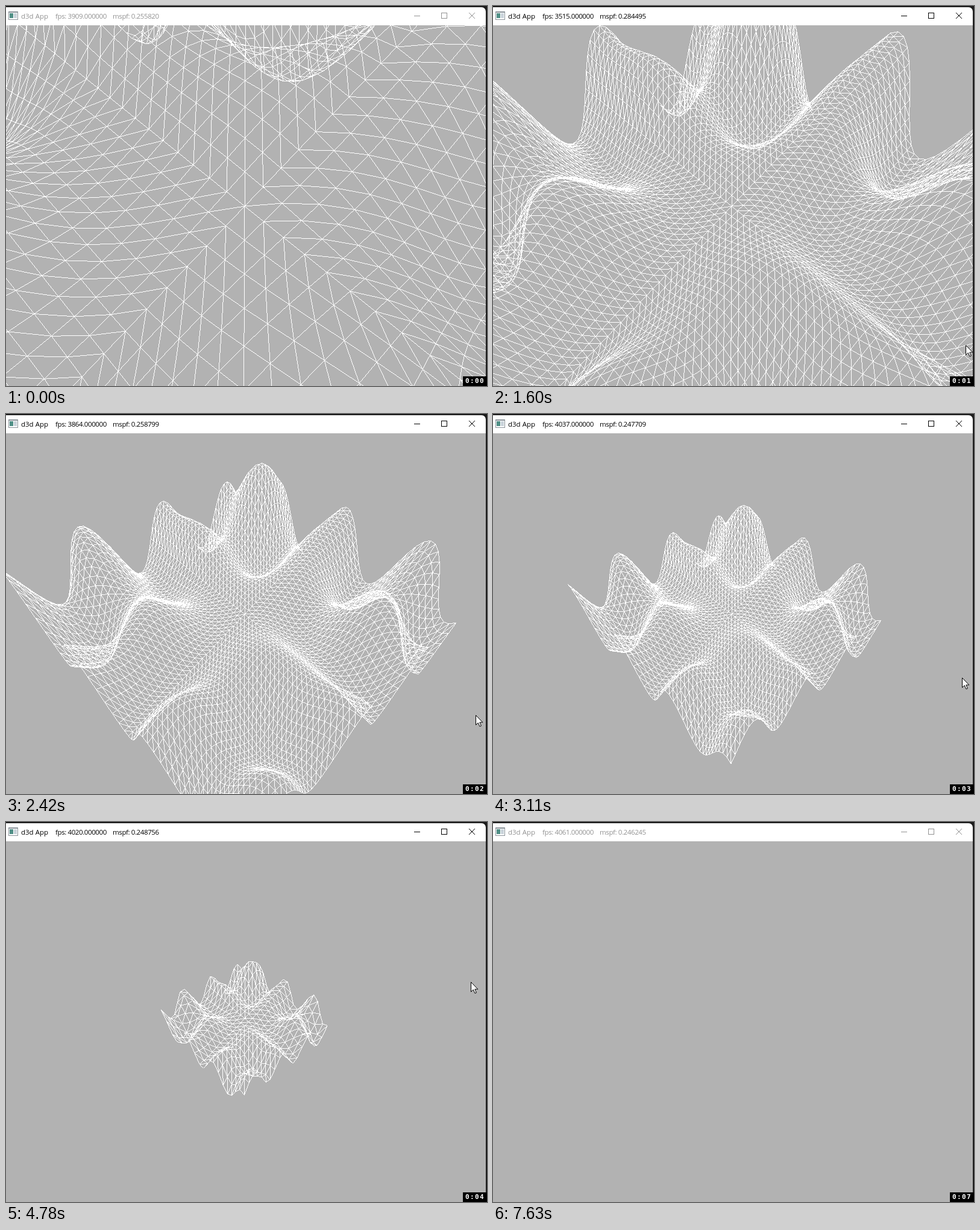
Recreate the animation shown at these times as an HTML page with a canvas. Size 798 px wide and 630 px high, loop 7.66 s.

```html
<!DOCTYPE html>
<html>
<head>
<meta charset="utf-8">
<style>
html, body { margin: 0; width: 100%; height: 100%; overflow: hidden; background: #1c1c1c; }
canvas { display: block; }
</style>
</head>
<body>
<canvas id="stage" width="798" height="630"></canvas>
<script>
const LOOP = 7660, TOP = 32, W = 796, H = 598;
const GREY = 0xffb2b2b2, WHITE = 0xffffffff;
const FOCAL = 300 / Math.tan(Math.PI / 8), CX = 396, CY = 300, NEAR = 1;
const THETA = 225.2 * Math.PI / 180, PHI = 37 * Math.PI / 180;
const [sinT, cosT, sinP, cosP] = [Math.sin(THETA), Math.cos(THETA), Math.sin(PHI), Math.cos(PHI)];

// time, camera distance
const ZOOM = [[610, 5.22], [1050, 10.55], [1600, 16.75], [2420, 28.5], [2830, 35.6], [3970, 56.1],
  [5155, 82.1], [5860, 92.8], [5960, 92.8], [6740, 100.2]];
// time, pointer x, pointer y
const POINTER = [[490, 789, 630], [610, 786, 619], [1050, 784, 593], [1600, 784, 562], [2420, 779, 499],
  [3970, 777, 361], [5155, 768, 221], [5860, 758, 157], [5960, 758, 157], [6740, 757.5, 118],
  [6860, 757, 114], [6990, 757, 114], [7400, 781, 606]];
// time, frames per second in the title
const RATES = [[0, 3909], [900, 3515], [1915, 3864], [2930, 4037], [3945, 4020], [4960, 4018],
  [5975, 4042], [7000, 4061]];

const ctx = document.getElementById('stage').getContext('2d');
const image = ctx.createImageData(W, H);
const pixels = new Uint32Array(image.data.buffer);

function track(keys, t) {
  if (t <= keys[0][0]) return keys[0].slice(1);
  for (let i = 1; i < keys.length; i++) {
    const a = keys[i - 1], b = keys[i];
    if (t < b[0]) {
      const f = (t - a[0]) / (b[0] - a[0]);
      return a.slice(1).map((v, k) => v + (b[k + 1] - v) * f);
    }
  }
  return keys[keys.length - 1].slice(1);
}

// World point on the surface to view space: right, up, depth
function view(x, z, r) {
  const h = 0.3 * (z * Math.sin(x) + x * Math.cos(z));
  const s = -(x * cosT + z * sinT);
  return [z * cosT - x * sinT, h * sinP + s * cosP, r - h * cosP + s * sinP];
}

const facing = (a, b, c) =>
  a[0] * (b[1] * c[2] - b[2] * c[1]) -
  a[1] * (b[0] * c[2] - b[2] * c[0]) +
  a[2] * (b[0] * c[1] - b[1] * c[0]) > 0;

function clipNear(p, q) {
  if (p[2] >= NEAR) return p;
  const f = (NEAR - p[2]) / (q[2] - p[2]);
  return [p[0] + (q[0] - p[0]) * f, p[1] + (q[1] - p[1]) * f, NEAR];
}

// Hard-edged line, one pixel per step of the longer axis
function line(p, q) {
  if (p[2] < NEAR && q[2] < NEAR) return;
  const a = clipNear(p, q), b = clipNear(q, p);
  let x0 = CX + FOCAL * a[0] / a[2], y0 = CY - FOCAL * a[1] / a[2];
  let x1 = CX + FOCAL * b[0] / b[2], y1 = CY - FOCAL * b[1] / b[2];
  if (Math.max(x0, x1) < 0 || Math.min(x0, x1) > W || Math.max(y0, y1) < 0 || Math.min(y0, y1) > H) return;
  if (Math.abs(x1 - x0) >= Math.abs(y1 - y0)) {
    if (x0 > x1) [x0, y0, x1, y1] = [x1, y1, x0, y0];
    const slope = (y1 - y0) / (x1 - x0 || 1);
    const end = Math.min(W, Math.ceil(x1 - 0.5));
    for (let x = Math.max(0, Math.ceil(x0 - 0.5)); x < end; x++) {
      const y = Math.floor(y0 + (x + 0.5 - x0) * slope);
      if (y >= 0 && y < H) pixels[y * W + x] = WHITE;
    }
  } else {
    if (y0 > y1) [x0, y0, x1, y1] = [x1, y1, x0, y0];
    const slope = (x1 - x0) / (y1 - y0);
    const end = Math.min(H, Math.ceil(y1 - 0.5));
    for (let y = Math.max(0, Math.ceil(y0 - 0.5)); y < end; y++) {
      const x = Math.floor(x0 + (y + 0.5 - y0) * slope);
      if (x >= 0 && x < W) pixels[y * W + x] = WHITE;
    }
  }
}

function triangle(a, b, c) {
  if (!facing(a, b, c)) return;
  line(a, b);
  line(b, c);
  line(c, a);
}

// Patch from -10 to 10, split more finely the closer the camera is
function drawMesh(r) {
  pixels.fill(GREY);
  const n = Math.ceil(64 * Math.min(1, Math.max(0, (100 - r) / 80)));
  const grid = [];
  for (let i = 0; n && i <= n; i++) {
    grid.push([]);
    for (let j = 0; j <= n; j++) grid[i].push(view(20 * i / n - 10, 20 * j / n - 10, r));
  }
  for (let i = 0; i < n; i++) {
    for (let j = 0; j < n; j++) {
      const a = grid[i][j], b = grid[i + 1][j], c = grid[i + 1][j + 1], d = grid[i][j + 1];
      // Diagonals point away from the middle of the patch
      if ((2 * i + 1 - n) * (2 * j + 1 - n) > 0) {
        triangle(a, b, c);
        triangle(a, c, d);
      } else {
        triangle(a, b, d);
        triangle(b, c, d);
      }
    }
  }
  ctx.putImageData(image, 0, TOP);
}

function rect(color, x, y, w, h) {
  ctx.fillStyle = color;
  ctx.fillRect(x, y, w, h);
}

function text(s, x, y, font, spacing, color) {
  ctx.font = font;
  ctx.letterSpacing = spacing + 'px';
  ctx.fillStyle = color;
  ctx.fillText(s, x, y);
}

function drawTitle(t) {
  const ink = t >= 310 && t < 7630 ? '#000' : '#929292';
  const fps = RATES.filter(k => k[0] <= t).pop()[1];
  const font = '11.5px "Open Sans", "Noto Sans", sans-serif';
  ctx.fillStyle = '#fff';
  ctx.beginPath();
  ctx.roundRect(-10, 2, W + 10, 40, 7);
  ctx.fill();

  rect('#8a9299', 4, 9, 16, 14);
  rect('#fff', 5, 11, 14, 11);
  rect('#4f8f86', 6, 12, 6, 8);
  rect('#c9d3da', 13, 12, 5, 8);

  text('d3d App', 25, 21, font, 0, ink);
  text('fps: ' + fps.toFixed(6), 82, 21, font, -0.4, ink);
  text('mspf: ' + (1000 / fps).toFixed(6), 177, 21, font, -0.4, ink);

  rect(ink, 677, 16, 10, 1);
  ctx.strokeStyle = ink;
  ctx.lineWidth = 1;
  ctx.strokeRect(722.5, 11.5, 9, 9);
  ctx.beginPath();
  ctx.moveTo(768, 11);
  ctx.lineTo(778, 21);
  ctx.moveTo(778, 11);
  ctx.lineTo(768, 21);
  ctx.stroke();
}

const arrow = new Path2D('M.5 .5V16.5L4.2 13L7 19L9.4 18L6.8 12.2H11.8Z');

function drawPointer(t) {
  if (t < 490 || t >= 7420) return;
  const [x, y] = track(POINTER, t);
  ctx.save();
  ctx.translate(Math.round(x), Math.round(y));
  ctx.fillStyle = '#fff';
  ctx.strokeStyle = '#000';
  ctx.fill(arrow);
  ctx.stroke(arrow);
  ctx.restore();
}

const start = performance.now();

function frame() {
  const t = (performance.now() - start) % LOOP;
  rect('#1c1c1c', 0, 0, 798, 630);
  drawTitle(t);
  drawMesh(track(ZOOM, t)[0]);
  drawPointer(t);
  rect('#000', 758, 614, 40, 16);
  text('0:0' + Math.floor(t / 1000), 762, 625, 'bold 11px "DejaVu Sans Mono", monospace', 1.4, '#fff');
  requestAnimationFrame(frame);
}

frame();
</script>
</body>
</html>
```
